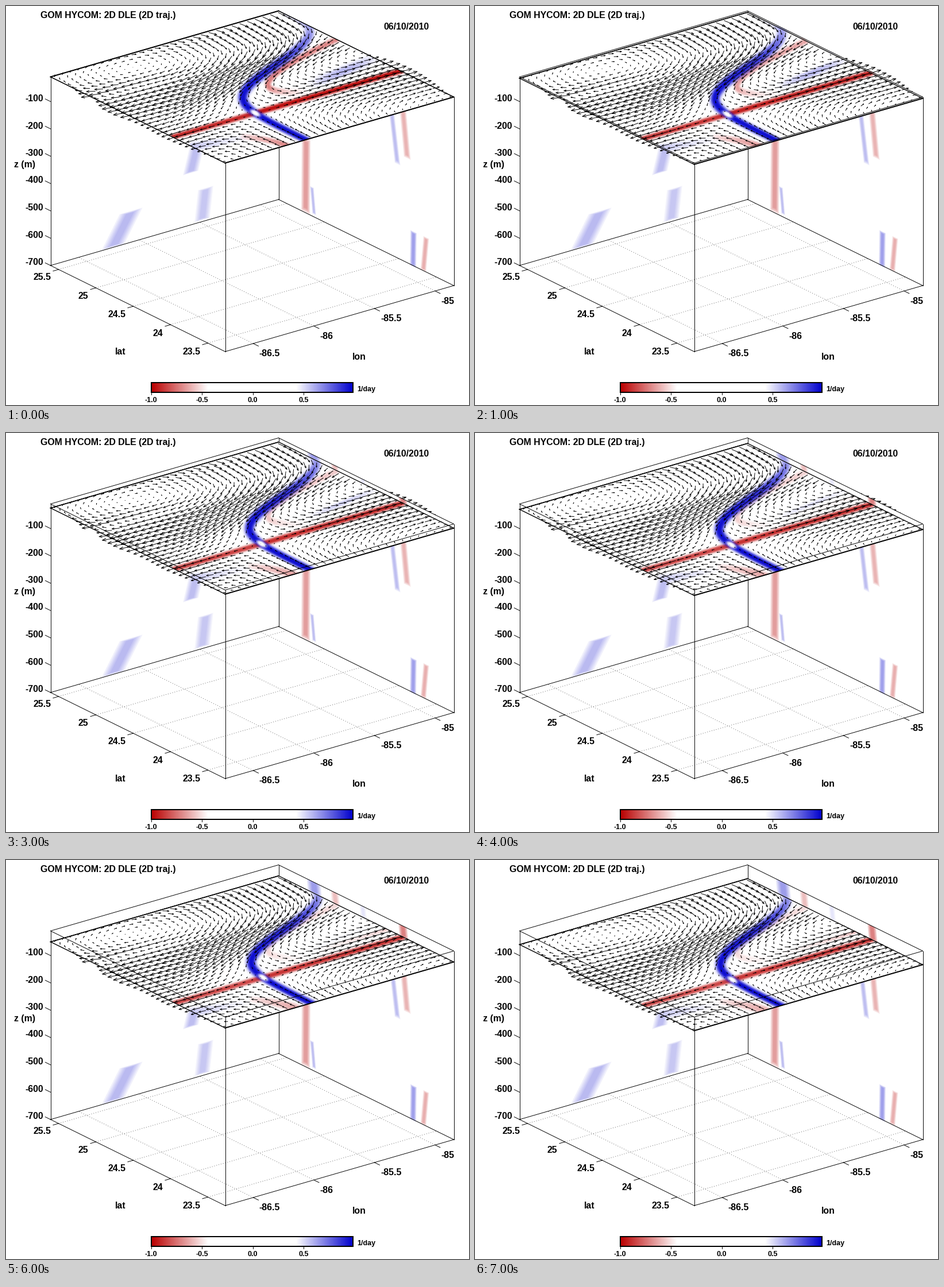
Write a matplotlib script that moves like this. It is 806 by 695 pixels and loops after 8 s.

```python
import numpy as np
import matplotlib.pyplot as plt
from matplotlib.animation import FuncAnimation
from matplotlib.collections import LineCollection
from matplotlib.patches import Polygon
from matplotlib.transforms import Affine2D

W, H, DPI = 806, 695, 100
PX = 72 / DPI
RED = np.array([186, 0, 0]) / 255
BLUE = np.array([0, 0, 205]) / 255

# Corners of the box top; the floor lies HEIGHT pixels lower.
LEFT, BACK = np.array([77, 123]), np.array([474, 8])
RIGHT, FRONT = np.array([779, 158]), np.array([381, 273])
TOP = [LEFT, BACK, RIGHT, FRONT]
LON, LAT = BACK - LEFT, FRONT - LEFT
HEIGHT = 328.5
M_TO_PX = 0.476
N = 8

plt.rcParams["font.family"] = "Liberation Sans"
plt.rcParams["font.weight"] = "bold"
fig = plt.figure(figsize=(W / DPI, H / DPI), dpi=DPI, facecolor="white")
ax = fig.add_axes([0, 0, 1, 1])
ax.axis("off")


def down(p, dy):
    return np.array([p[0], p[1] + dy])


def line(p, q, z=2, lw=0.95, color="black", **kw):
    ax.plot([p[0], q[0]], [p[1], q[1]], color=color, lw=lw * PX, zorder=z, **kw)


def loop(corners, z):
    for a, b in zip(corners, corners[1:] + corners[:1]):
        line(a, b, z)


def label(x, y, s, ha="center", px=15.9):
    ax.text(x, y, s, ha=ha, va="center", fontsize=px * PX, color="black", zorder=9)


# ---------- static scene ----------
def draw_box():
    floor = [down(p, HEIGHT) for p in TOP]
    fl, fb, fr, ff = floor
    loop(floor, 2)
    loop(TOP, 8)
    line(BACK, fb)
    for a, b in ((LEFT, fl), (FRONT, ff), (RIGHT, fr)):
        line(a, b, 8)

    out_lat, out_lon = LAT * 0.03, -LON * 0.024
    dots = dict(lw=0.9, color="0.3", linestyle=(0, (1, 3.4)))
    for i in range(4):
        p = ff + LON * (0.123 + 0.2656 * i)
        line(p, p - LAT, **dots)
        line(p, p + out_lat)
        label(440 + 105.7 * i, 605 - 30.3 * i, f"{-86.5 + 0.5 * i:g}", "left")
    for i in range(5):
        p = fl + LAT * (0.046 + 0.2138 * i)
        line(p, p + LON, **dots)
        line(p, p + out_lon)
        label(78 + 65 * i, 472 + 32.6 * i, f"{25.5 - 0.5 * i:g}", "right")
    for i in range(7):
        p = down(fl, -i * 100 * M_TO_PX)
        line(p, p - out_lat)
        label(64, 446 - 47.5 * i, str(-700 + 100 * i), "right")


def draw_text():
    label(60, 16, "GOM HYCOM: 2D DLE (2D traj.)", "left")
    label(657, 36, "06/10/2010", "left")
    label(13, 276, "z (m)", "left")
    label(199, 602, "lat")
    label(614, 611, "lon")


def draw_colorbar():
    x0, x1, y0, y1 = 252, 603, 655.5, 672
    v = np.linspace(-1, 1, 300)
    a = np.clip((abs(v) - 0.44) / 0.56, 0, 1)[:, None]
    base = np.where(v[:, None] < 0, RED, BLUE)
    ax.imshow((1 - a + a * base)[None], extent=(x0, x1, y1, y0),
              aspect="auto", zorder=2)
    ax.add_patch(Polygon([(x0, y0), (x1, y0), (x1, y1), (x0, y1)],
                         fill=False, ec="black", lw=2 * PX, zorder=3))
    for i in range(4):
        x = x0 + 88.5 * i
        line((x, y1), (x, y1 + 4), 3)
        label(x, 687, f"{-1 + 0.5 * i:.1f}", px=12.5)
    label(611, 667, "1/day", "left", 12.5)


def streak(top, bottom, width, color, alpha, z=1):
    """Soft band hanging on a back wall, its ends parallel to the wall top."""
    wall = LON if top[0] < BACK[0] else LAT
    parts = []
    for k in np.linspace(1.1, 0.4, 5):
        half = wall / wall[0] * width * k / 2
        cut = (np.array(bottom) - top) * (1 - k) * 0.08
        a, b = top + cut, bottom - cut
        parts.append(ax.add_patch(Polygon([a - half, a + half, b + half, b - half],
                                          fc=color, ec="none", alpha=alpha / 4, zorder=z)))
    return parts


def draw_walls():
    streak((332, 243), (321, 290), 24, BLUE, 0.22)
    streak((347, 317), (341, 372), 24, BLUE, 0.19)
    streak((217, 357), (186, 419), 36, BLUE, 0.24)
    streak((522, 230), (521, 358), 14, RED, 0.36)
    streak((532, 315), (536, 362), 6, BLUE, 0.22)
    streak((670, 178), (681, 274), 9, BLUE, 0.22)
    streak((690, 176), (698, 264), 11, RED, 0.26)
    streak((709, 393), (708, 453), 10, BLUE, 0.34)
    streak((731, 403), (726, 460), 9, RED, 0.28)


# ---------- slice: ridges and flow ----------
NS, NT = 300, 240
S, T = np.meshgrid((np.arange(NS) + 0.5) / NS, (np.arange(NT) + 0.5) / NT)


def offset(s, t):
    """Screen offset of slice position (s, t) from its left corner."""
    return s * LON[0] + t * LAT[0], s * LON[1] + t * LAT[1]


GX, GY = offset(S, T)


def sigmoid(x):
    return 1 / (1 + np.exp(-np.clip(x, -40, 40)))


def depth(i):
    return 10 + 5 * i + 5 * max(0, i - 4)


def drift(i):
    return (1 - np.exp(-i / 2.2)) / (1 - np.exp(-(N - 1) / 2.2))


def blue_at(t, q):
    return 0.35 + 0.028 * q + 0.68 * sigmoid((0.39 + 0.012 * q - t) / 0.075)


def red_at(q):
    return 0.70 + 0.009 * q


def ridge(s, t, amp, width):
    """Strength around a curve: a flat-topped bell over screen distance."""
    best = np.full(S.shape, 1e9)
    a, w = np.zeros(S.shape), np.ones(S.shape)
    xs, ys = offset(s, t)
    for row in np.broadcast(xs, ys, amp, width):
        d2 = (GX - row[0]) ** 2 + (GY - row[1]) ** 2
        near = d2 < best
        best[near], a[near], w[near] = d2[near], row[2], row[3]
    return a * np.exp(-(best / w ** 2) ** 1.5)


def slice_image(q):
    img = np.ones(S.shape + (3,))
    u = np.linspace(0, 1, 70)
    bump = np.sin(np.pi * u)

    def paint(color, *curve):
        a = ridge(*curve)[..., None]
        img[:] = img * (1 - a) + color * a

    # Hook, right-hand streaks, and the two faint arcs near the front corner.
    t = 0.33 + 0.32 * u
    paint(RED, 0.54 + 8.9 * (t - 0.56) ** 2, t,
          (0.5 - 0.36 * q) * np.clip((0.66 - t) / 0.12, 0, 1), 5.5)
    s = 0.66 + 0.36 * u
    paint(BLUE, s, 0.61 - 0.06 * u, 0.28 * bump * (1 - q ** 4), 8 - 5 * q)
    paint(RED, s, 0.63 - 0.01 * u, 0.25 * u * q ** 12, 3)
    paint(RED, 0.19 + 0.04 * q + 0.075 * np.sin(u * np.pi / 2), 0.835 + 0.18 * u,
          (0.5 - 0.15 * q) * np.sqrt(u), 5 + 3 * q * u)
    paint(BLUE, 0.22 * u, 0.815 + 0.05 * u, 0.2 * (1 - u), 8 - 4 * u)

    s = np.linspace(0, 1, 160)
    y0 = red_at(q)
    right = sigmoid((s - 0.37) / 0.02)
    paint(RED, s, y0 + 0.0 * s, (0.95 - 0.15 * q) * (0.9 + 0.1 * right), 4.8 + 0.4 * right)
    t = np.linspace(0.02, 1.01, 170)
    paint(BLUE, blue_at(t, q), t, 0.25 + 0.7 * sigmoid((t - 0.3) / 0.06),
          8.5 - 2.3 * sigmoid((t - 0.66) / 0.03))

    # Blank patch where the two main ridges cross.
    x0, x1 = offset(blue_at(y0, q), y0)
    dx, dy = GX - x0, GY - x1
    along, across = dx * 0.87 + dy * 0.5, dy * 0.87 - dx * 0.5
    gap = np.exp(-((along / 10) ** 2 + (across / 4.5) ** 2) ** 2)[..., None]
    rgb = img * (1 - gap) + gap
    return np.dstack([rgb, np.ones(S.shape)])


def stream(s, t, q):
    """Saddle on the ridge crossing with an eddy in each quadrant."""
    x, y = s - blue_at(t, q), red_at(q) - t
    east, north = sigmoid(x / 0.05), sigmoid(y / 0.03)

    def mix(k, a, b):
        return a * (1 - k) + b * k

    west = blue_at(t, q) - 0.28 + 0.9 * np.maximum(0, t - 0.25)
    wx = mix(north, mix(east, 0.41, 0.6), mix(east, west, 0.6))
    wy = mix(north, 0.32, mix(east, 0.55, 0.26))
    return x * y * np.exp(-((x / wx) ** 2 + (y / wy) ** 2) / 2)


def flow_segments(q, dy):
    s, t = [a.ravel() for a in np.meshgrid(np.linspace(0.01, 0.99, 30),
                                           np.linspace(0.01, 0.99, 32))]
    e = 4e-3
    ds = (stream(s, t - e, q) - stream(s, t + e, q)) / (2 * e)
    dt = (stream(s + e, t, q) - stream(s - e, t, q)) / (2 * e)
    base = LEFT + [0, dy] + np.stack(offset(s, t), axis=1)
    vec = 0.15 * np.stack(offset(ds, dt), axis=1)
    size = np.hypot(*vec.T)[:, None]
    vec *= np.minimum(1, 23 / np.maximum(size, 1e-9))
    tip = base + vec
    side = vec[:, ::-1] * [-1, 1] * 0.11
    shaft = np.stack([base, tip], axis=1)
    head = np.stack([tip - 0.3 * vec + side, tip, tip - 0.3 * vec - side], axis=1)
    return list(shaft) + list(head)


def wall_bands():
    """Ridges continued up the back wall, seen above the sinking slice."""
    parts = []
    for t, width, color, alpha in ((0.2, 22, BLUE, 0.36), (0.32, 13, RED, 0.22),
                                   (0.48, 10, BLUE, 0.08), (0.71, 14, RED, 0.5)):
        top = BACK + LAT * t
        parts += streak(down(top, -4), down(top, 60) + [6, 0], width, color, alpha, 7)
    return parts


draw_walls()
draw_box()
draw_text()
draw_colorbar()

images = [slice_image(drift(i)) for i in range(N)]
sheet = ax.imshow(images[0], extent=(0, 1, 0, 1), origin="lower", aspect="auto",
                  interpolation="bilinear", zorder=3)
rims = [ax.plot([], [], color="black", lw=w * PX, zorder=4)[0]
        for w in (2, 1.4, 2, 1.4)]
arrows = ax.add_collection(LineCollection([], colors="black", linewidths=0.95 * PX,
                                          zorder=5))
strip = ax.add_patch(Polygon(TOP[:3], fc="white", ec="none", zorder=6))
bands = wall_bands()
post, = ax.plot([], [], color="black", lw=0.95 * PX, zorder=8)
ax.set_xlim(-0.5, W - 0.5)
ax.set_ylim(H - 0.5, -0.5)


def update(i):
    dy = (depth(i) - depth(0)) * M_TO_PX
    sheet.set_data(images[i])
    skew = Affine2D.from_values(*LON, *LAT, LEFT[0], LEFT[1] + dy)
    sheet.set_transform(skew + ax.transData)
    ring = [down(p, dy) for p in TOP + TOP[:1]]
    for rim, a, b in zip(rims, ring, ring[1:]):
        rim.set_data([a[0], b[0]], [a[1], b[1]])
    arrows.set_segments(flow_segments(drift(i), dy))
    # Stop just short of the slice so its rim stays whole.
    low = max(dy - 1, 0)
    strip.set_xy(TOP[:3] + [down(p, low) for p in TOP[2::-1]])
    strip.set_visible(dy > 0)
    for band in bands:
        band.set_visible(dy > 0)
        band.set_clip_path(strip)
    post.set_data([BACK[0], BACK[0]], [BACK[1], BACK[1] + dy])
    return [sheet, arrows, strip, post, *rims, *bands]


anim = FuncAnimation(fig, update, frames=N, interval=1000, repeat=True, blit=False)
plt.show()
```
